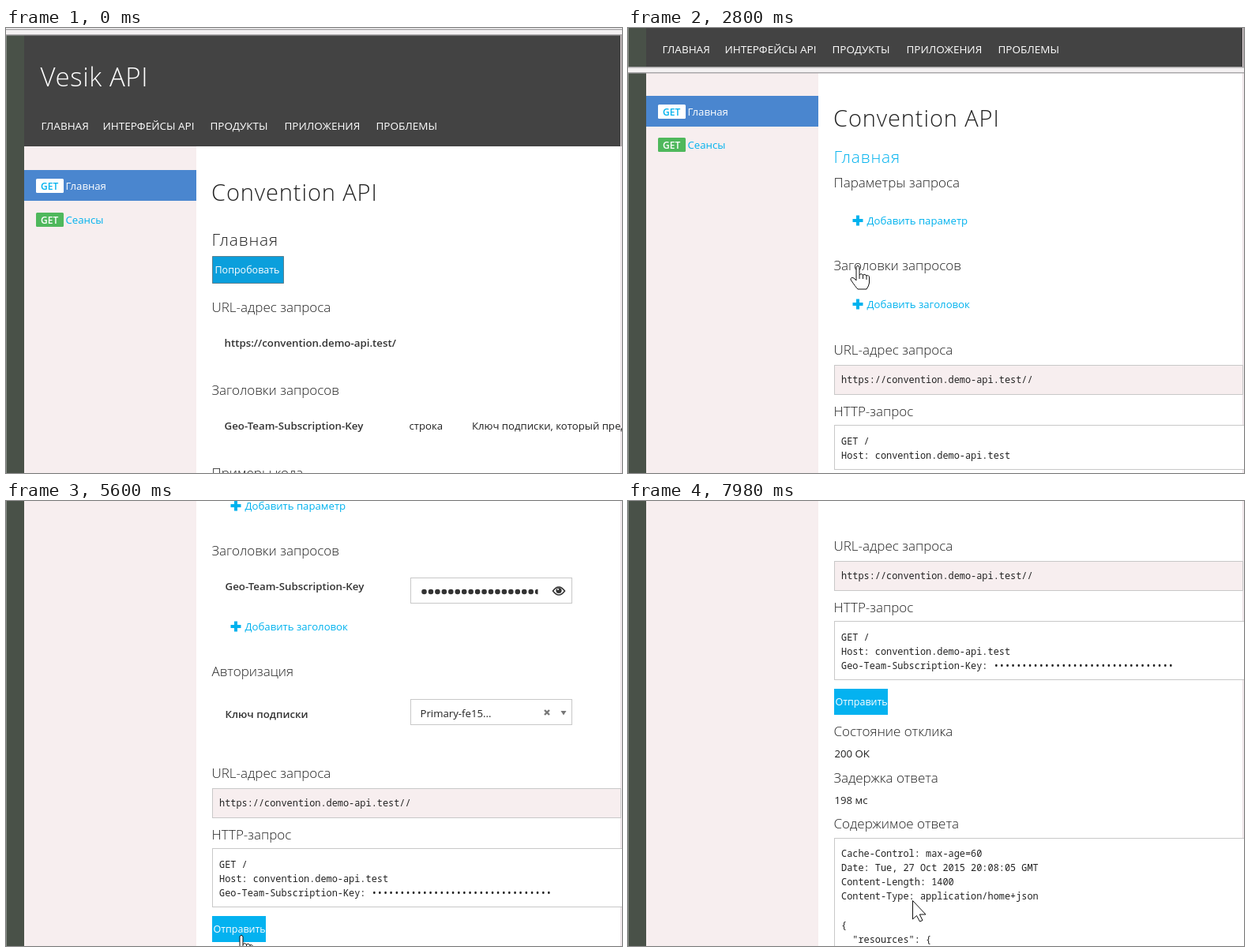
An HTML page for the animation above (8000 ms loop, 780 by 564 pixels).

```html
<!DOCTYPE html>
<html lang="ru">
<head>
<meta charset="utf-8">
<title>API console</title>
<style>
  html, body { margin: 0; width: 100%; height: 100%; overflow: hidden; background: #fff; }
  svg { display: block; width: 780px; height: 564px; }
  text { font: 13.2px "Open Sans", "Noto Sans", sans-serif; fill: #222; white-space: pre; }
  .brand { font-size: 33px; font-weight: 300; letter-spacing: .6px; fill: #fff; }
  .nav { font-size: 13.5px; fill: #fff; }
  .title { font-size: 29px; font-weight: 300; letter-spacing: .9px; }
  .operation { font-size: 21px; font-weight: 300; letter-spacing: .8px; }
  .section { font-size: 17px; font-weight: 300; }
  .strong { font-size: 13.3px; font-weight: 600; fill: #333; }
  .badge { font-size: 12px; font-weight: 600; }
  .button { font-size: 12.5px; fill: #fff; }
  .code { font: 11.9px "Noto Sans Mono", "DejaVu Sans Mono", monospace; }
  .link { fill: #00b2ee; }
  .white { fill: #fff; }
</style>
</head>
<body>
<svg viewBox="0 0 780 564">
  <g id="startPage"></g>
  <g id="consolePage">
    <g id="consoleFrame"></g>
    <g id="plainForm"></g>
    <g id="keyForm"></g>
  </g>
  <g id="cursor" stroke="#111" stroke-width="1" stroke-linejoin="round" fill="#fff">
    <path id="arrow" d="M.5 .5V24L5.5 19.5L9.5 27L13 25.5L9.3 18H17Z"/>
    <path id="hand" transform="translate(0 1)" d="M-2 2Q0-1.5 2 2V12Q4 9 6.5 12Q9 10 11 13Q14 11.5 14.5 15V22Q14 26 11 30H0Q-3 27-9 18Q-9 14-5 16L-2 19ZM2 12V17M6.5 12V17M11 13V18"/>
  </g>
</svg>
<script>
const $ = id => document.getElementById(id);
const HOST = 'convention.demo-api.test';
const KEY = 'Geo-Team-Subscription-Key';

// y is the visual middle of a line; drop is the distance to its baseline
const text = (x, y, str, cls = '', drop = 5) => `<text x="${x}" y="${y + drop}" class="${cls}">${str}</text>`;
const rect = (x, y, w, h, fill, extra = '') => `<rect x="${x}" y="${y}" width="${w}" height="${h}" fill="${fill}" ${extra}/>`;
const box = (x, y, w, h, fill = '#fff') => rect(x + .5, y + .5, w - 1, h - 1, fill, 'stroke="#c8c8c8"');
const section = (y, str) => text(260.5, y, str, 'section', 6);
const code = (y, str) => text(270, y, str, 'code', 4);
const band = y => rect(0, y, 780, 8, '#f4f1f2') + rect(0, y, 780, 1.5, '#aaa8aa') + rect(0, y + 7, 780, 1.5, '#aaa8aa');

const badge = (y, fill, cls) => rect(38, y - 9, 35, 18, fill, 'rx="1.5"') + text(44, y, 'GET', 'badge ' + cls, 4.5);

const addLink = (y, str) =>
  `<path d="M284.5 ${y}h13M291 ${y - 6.5}v13" stroke="#00b2ee" stroke-width="4"/>` + text(302.5, y, str, 'link');

const sendButton = y => rect(261, y, 68, 33, '#04b2f0') + text(262.5, y + 16, 'Отправить', 'button');

function frame(headerBottom, navY, select, first, second, left) {
  const nav = [[left + 1, 'ГЛАВНАЯ'], [122.5, 'ИНТЕРФЕЙСЫ API'], [258.5, 'ПРОДУКТЫ'], [352.5, 'ПРИЛОЖЕНИЯ'], [468.5, 'ПРОБЛЕМЫ']];
  return rect(0, 0, 780, 1400, '#fff') +
    rect(23, 0, 218, 1400, '#f7eeef') +
    rect(0, 0, 23, 1400, '#495148') + rect(0, 0, 1, 1400, '#858a84') +
    rect(23, 0, 757, headerBottom, '#434343') +
    rect(778, 0, 1.5, 1400, '#eadfe3') +
    rect(0, 0, 780, 1, '#fff') + band(1) +
    text(left, navY - 63, 'Vesik API', 'brand', 13) +
    nav.map(([x, str]) => text(x, navY, str, 'nav')).join('') +
    rect(23, select, 218, 39, '#4a86cf') +
    badge(first, '#fff', 'link') + text(75.5, first, 'Главная', 'white') +
    badge(second, '#4fb85c', 'white') + text(75.5, second, 'Сеансы', 'link');
}

function request(y, keyLine) {
  const codeBox = y + 95, height = keyLine ? 75 : 57;
  return section(y, 'URL-адрес запроса') +
    box(261, y + 19, 518, 38, '#f7eeef') +
    code(y + 38, `https://${HOST}//`) +
    section(y + 78, 'HTTP-запрос') +
    box(261, codeBox, 540, height) +
    code(codeBox + 21, 'GET /') +
    code(codeBox + 39, 'Host: ' + HOST) +
    (keyLine ? code(codeBox + 57, KEY + ': ' + '•'.repeat(32)) : '') +
    sendButton(codeBox + height + 11);
}

$('startPage').innerHTML = frame(150, 124, 180, 200, 243, 43.5) +
  text(260, 208, 'Convention API', 'title', 11) +
  text(260.5, 268, 'Главная', 'operation', 8) +
  rect(261.5, 289.5, 90, 34, '#0b9fdc', 'stroke="#333" stroke-dasharray="1 1"') +
  text(264.5, 305.5, 'Попробовать', 'button') +
  section(354, 'URL-адрес запроса') +
  text(276.5, 399, `https://${HOST}/`, 'strong') +
  section(459, 'Заголовки запросов') +
  text(276.5, 504, KEY, 'strong') +
  text(510.5, 504, 'строка') +
  text(590, 504, 'Ключ подписки, который предоставляет доступ') +
  section(564, 'Примеры кода');

$('consoleFrame').innerHTML = frame(144, 122, 181, 201, 243, 42.5) + band(144) +
  text(260, 209, 'Convention API', 'title', 11) +
  text(260.5, 258, 'Главная', 'operation link', 8) +
  section(291, 'Параметры запроса') +
  addLink(339, 'Добавить параметр') +
  section(396, 'Заголовки запросов');

$('plainForm').innerHTML = addLink(445, 'Добавить заголовок') + request(503, false);

const response = [
  [1068, 'Cache-Control: max-age=60'],
  [1086, 'Date: Tue, 27 Oct 2015 20:08:05 GMT'],
  [1104, 'Content-Length: 1400'],
  [1122, 'Content-Type: application/home+json'],
  [1159, '{'],
  [1177, '  "resources": {']
];

$('keyForm').innerHTML =
  text(277.5, 441, KEY, 'strong') +
  box(512, 430, 205, 33) +
  `<path d="M529.5 448H678" stroke="#333" stroke-width="6.6" stroke-linecap="round" stroke-dasharray="0 8.45"/>` +
  rect(673.5, 440, 8, 16, '#fff') +
  `<path d="M692.5 447Q700 437 707.5 447Q700 457 692.5 447Z" fill="none" stroke="#333" stroke-width="1.6"/>
   <circle cx="700" cy="446.5" r="3.6" fill="#333"/><circle cx="699" cy="445" r="1.1" fill="#fff"/>` +
  addLink(492, 'Добавить заголовок') +
  section(549, 'Авторизация') +
  text(277.5, 603, 'Ключ подписки', 'strong') +
  box(512, 584, 205, 33) +
  text(524.5, 602, 'Primary-fe15...') +
  `<path d="M682 598l6 6m0-6l-6 6" stroke="#777" stroke-width="2.4"/><path d="M702.5 599h7l-3.5 5.5z" fill="#777"/>` +
  request(678, true) +
  section(913, 'Состояние отклика') +
  text(261.5, 941, '200 OK') +
  section(972, 'Задержка ответа') +
  text(261.5, 1000, '198 мс') +
  section(1030, 'Содержимое ответа') +
  box(261, 1048, 540, 400) +
  response.map(([y, str]) => code(y, str)).join('');

const LOOP = 8000, STEP = 70;
const progress = (t, from, to) => Math.min(1, Math.max(0, (t - from) / (to - from)));
const easeInOut = p => (1 - Math.cos(Math.PI * p)) / 2;
const easeOut = p => 1 - (1 - p) ** 1.685;

function draw(now) {
  const t = Math.floor(now % LOOP / STEP) * STEP;

  const scroll = 127 * easeInOut(progress(t, 2100, 3150)) +
    206 * easeOut(progress(t, 3290, 3920)) +
    311 * easeInOut(progress(t, 7000, 8190));
  $('consolePage').setAttribute('transform', `translate(0 ${-Math.round(scroll)})`);
  $('consolePage').setAttribute('opacity', progress(t, 1120, 1680));

  const keyShown = t >= 3360;
  $('plainForm').style.display = keyShown ? 'none' : '';
  $('keyForm').style.display = keyShown ? '' : 'none';

  const down = easeInOut(progress(t, 5040, 5600));
  const away = easeInOut(progress(t, 7000, 7280));
  const x = 291 + 7 * down + 62 * away;
  const y = 300 + 249 * down - 43 * away;
  const pointing = !keyShown || (y >= 526 && t < 7070);
  $('cursor').setAttribute('transform', `translate(${Math.round(x)} ${Math.round(y)})`);
  $('cursor').setAttribute('opacity', progress(t, 210, 420));
  $('hand').style.display = pointing ? '' : 'none';
  $('arrow').style.display = pointing ? 'none' : '';
}

const start = performance.now();
function tick() {
  draw(performance.now() - start);
  requestAnimationFrame(tick);
}
tick();
</script>
</body>
</html>
```
